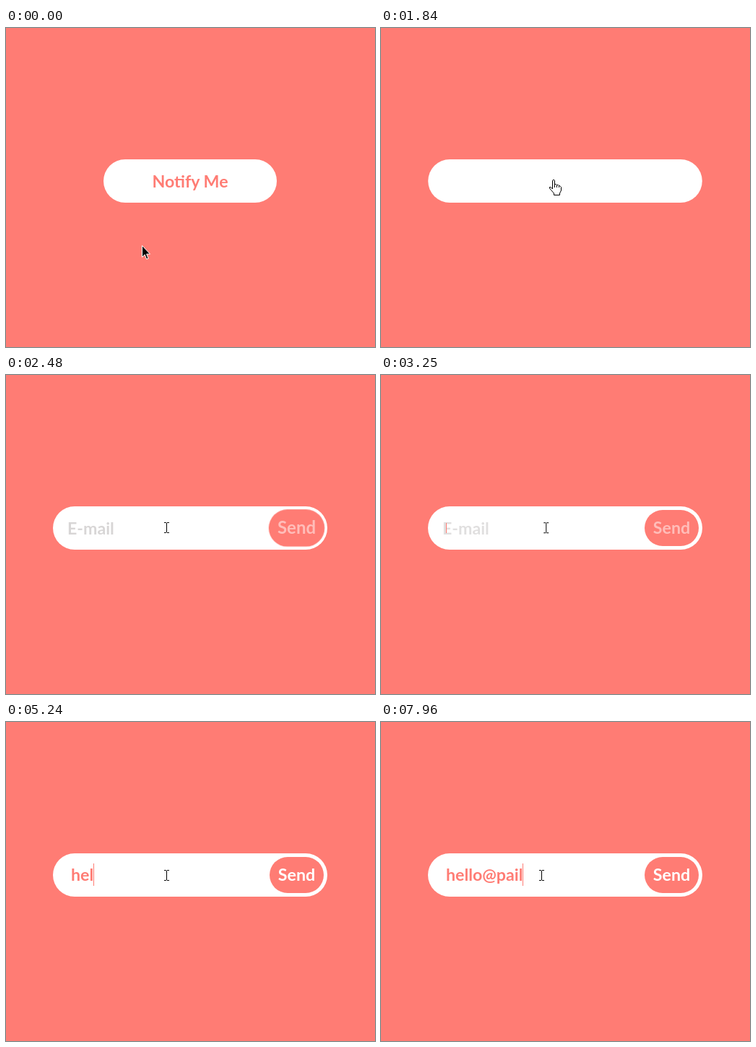
Write an HTML page that moves like this. It is 511 px wide and 442 px high and loops after 8000 ms.

```html
<!DOCTYPE html>
<html lang="en">
<head>
<meta charset="utf-8">
<title>Notify Me</title>
<style>
  html, body { margin: 0; width: 100%; height: 100%; overflow: hidden; background: #ff7c74; }
  svg { display: block; width: 100%; height: 100%; font: 700 23.2px Lato, sans-serif; }
  text { white-space: pre; }
  .coral { fill: #ff7c74; }
  .white { fill: #fff; }

  #pill, #label, #send, #sendText, #hint, #pointer, #arrow, #hand, #beam {
    animation: 8s linear infinite;
  }
  #pill { animation-name: grow; }
  #label { animation-name: label; }
  #send { animation-name: pop; transform-origin: 402.5px 212px; }
  #sendText { animation-name: enable; }
  #hint { animation-name: hint; }
  #pointer { animation-name: travel; }
  #arrow, #hand, #beam { animation-timing-function: step-end; }
  #arrow { animation-name: arrow; }
  #hand { animation-name: hand; }
  #beam { animation-name: beam; }

  @keyframes grow {
    0%, 20.125% { x: 135px; width: 240px; animation-timing-function: cubic-bezier(.175, .885, .32, 1.25); }
    27.625%, 100% { x: 65px; width: 380px; }
  }
  @keyframes label {
    0%, 20.125% { opacity: 1; }
    22.6%, 100% { opacity: 0; }
  }
  @keyframes pop {
    0%, 27.625% { transform: scale(0); animation-timing-function: cubic-bezier(.175, .885, .32, 1.25); }
    31.375%, 100% { transform: scale(1); }
  }
  @keyframes enable {
    0%, 53.625% { opacity: .5; }
    56.75%, 100% { opacity: 1; }
  }
  @keyframes hint {
    0%, 27.625% { opacity: 0; }
    30%, 40% { opacity: 1; }
    42.875%, 100% { opacity: 0; }
  }
  @keyframes travel {
    0%, 4.625% { transform: translate(188px, 301px); animation-timing-function: ease-in-out; }
    11.25%, 27.625% { transform: translate(238px, 210px); }
    30.5%, 31.375% { transform: translate(222px, 211px); }
    33.875%, 40% { transform: translate(230px, 211px); }
    42.875%, 100% { transform: translate(222px, 212px); }
  }
  @keyframes arrow { 0% { opacity: 1; } 8.5%, 100% { opacity: 0; } }
  @keyframes hand { 0% { opacity: 0; } 8.5% { opacity: 1; } 27.625%, 100% { opacity: 0; } }
  @keyframes beam { 0% { opacity: 0; } 27.625%, 100% { opacity: 1; } }
</style>
</head>
<body>
<svg viewBox="0 0 511 442">
  <rect class="coral" width="511" height="442"/>
  <rect id="pill" class="white" x="135" y="182" width="240" height="60" rx="30"/>
  <text id="label" class="coral" x="255" y="221" text-anchor="middle">Notify Me</text>

  <text id="hint" x="85" y="221" fill="#d8d6d6">E-mail</text>
  <text id="typed" class="coral" x="90" y="220"></text>
  <rect id="caret" class="coral" width="1"/>
  <g id="send">
    <rect class="coral" x="365" y="187" width="75" height="50" rx="25"/>
    <text id="sendText" class="white" x="402.5" y="220" text-anchor="middle">Send</text>
  </g>

  <g id="pointer">
    <path id="arrow" d="M.5.5V16.5L4.2 13 6.7 19.3 9.1 18.3 6.6 12.2H11.5Z" stroke="#fff"/>
    <g id="hand" fill="#fff" stroke="#000">
      <path d="M-.5 13V1.5Q-.5.5 1 .5T2.5 1.5V6.5H4.5L5.5 7.5H7.5L8.5 8.5H9.5L11.5 10.5V15L9.5 19V21.5H1.5V19L-2.5 14.5-4.5 12V10.5Q-3 9.5-.5 13Z"/>
      <path d="M2.5 6V11M5.5 7.5V11M8.5 8.5V11" fill="none"/>
    </g>
    <path id="beam" d="M-3-6.5H0M1-6.5H4M.5-6V7M-3 7.5H0M1 7.5H4" fill="none" stroke="#000"/>
  </g>
</svg>
<script>
  const LOOP = 8000;
  const HALF_FRAME = 10;
  const [pill, typed, caret] = ['pill', 'typed', 'caret'].map(id => document.getElementById(id));

  // Value of the field from each moment on, in ms.
  const entries = [
    [0, ''], [4290, 'h'], [4390, 'he'], [4540, 'hel'], [4790, 'helo'], [5060, 'hel'],
    [5240, 'he'], [5390, 'hel'], [5610, 'helo'], [6330, 'hel'], [6470, 'hell'], [6620, 'hello'],
    [6940, 'hello@'], [7500, 'hello@p'], [7660, 'hello@pa'], [7810, 'hello@pai'], [7960, 'hello@pail']
  ];
  const caretShown = [[3240, 3740], [4230, 6130], [6470, LOOP]];

  function draw() {
    // Share the clock of the CSS animations, rounded to the nearest frame.
    const now = pill.getAnimations()[0]?.currentTime ?? performance.now();
    const time = (now + HALF_FRAME) % LOOP;
    const value = entries.findLast(([start]) => start <= time)[1];
    if (typed.textContent !== value) typed.textContent = value;

    const width = value ? typed.getComputedTextLength() : 0;
    caret.setAttribute('x', 90 + Math.floor(width));
    caret.setAttribute('y', value ? 196 : 205);
    caret.setAttribute('height', value ? 31 : 14);
    const shown = caretShown.some(([start, end]) => time >= start && time < end);
    caret.setAttribute('visibility', shown ? 'visible' : 'hidden');
    requestAnimationFrame(draw);
  }
  draw();
</script>
</body>
</html>
```
